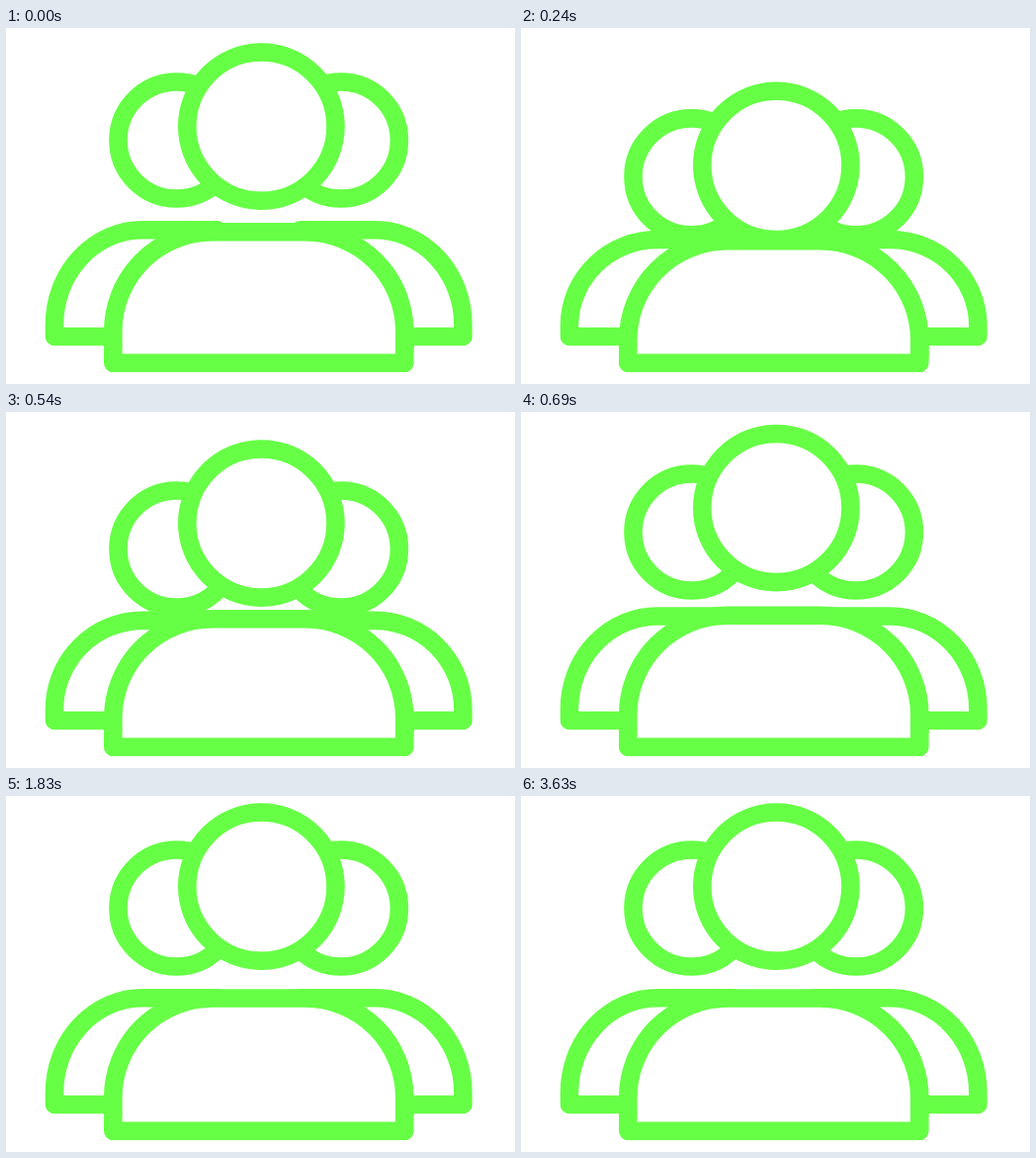
An HTML page without scripts that plays this animation: 515x360 px, repeating every 3810 ms.

```html
<!DOCTYPE html>
<html lang="en">
<head>
<meta charset="utf-8">
<title>Group nod</title>
<style>
  /* --k: how far a figure has ducked, 0 = upright, 1 = lowest */
  @property --k { syntax: "<number>"; inherits: true; initial-value: 0; }

  html, body { margin: 0; width: 100%; height: 100%; overflow: hidden; background: #fff; }
  svg { display: block; width: 515px; height: 360px; }

  .front, .back { animation: 3810ms linear infinite; }
  .front { --drop: 50px; animation-name: duck-front; }
  .back { --drop: 46px; animation-name: duck-back; }

  circle, path {
    fill: #fff;
    stroke: #66ff45;
    stroke-width: 18.6px;
    stroke-linecap: round;
    stroke-linejoin: round;
  }
  .head { transform: translateY(calc(var(--k) * var(--drop))); }
  .arch { transform: translateY(calc(var(--k) * 11.3px)); }
  .shoulder {
    vector-effect: non-scaling-stroke;
    transform: scaleY(calc(1 - var(--k) * .113));
    transform-origin: 0 312px;
  }

  @keyframes duck-front {
    0% { --k: .16; animation-timing-function: step-end; }
    1.575% { --k: .264; animation-timing-function: cubic-bezier(.33, .4, .67, 1); }
    7.612% { --k: 1; animation-timing-function: cubic-bezier(.3, 0, .38, 1); }
    23.097%, 100% { --k: 0; }
  }
  @keyframes duck-back {
    0%, .787% { --k: 0; animation-timing-function: cubic-bezier(.33, 0, .67, 1); }
    8.53% { --k: 1; animation-timing-function: cubic-bezier(.3, 0, .38, 1); }
    24.41%, 100% { --k: 0; }
  }
</style>
</head>
<body>
<svg viewBox="0 0 515 360">
  <g class="back">
    <path class="shoulder" d="M112 312H49V300A89 95.7 0 0 1 138 204.3H214"/>
    <circle class="head" cx="172.5" cy="113.5" r="59"/>
  </g>
  <g class="back" transform="matrix(-1 0 0 1 511.4 0)">
    <path class="shoulder" d="M112 312H49V300A89 95.7 0 0 1 138 204.3H214"/>
    <circle class="head" cx="172.5" cy="113.5" r="59"/>
  </g>
  <g class="front">
    <circle class="head" cx="258.4" cy="91.6" r="75.1"/>
    <path class="arch" d="M108.3 322V305A100.5 100.5 0 0 1 208.8 204.5H302.8A100.5 100.5 0 0 1 403.3 305V322"/>
    <path d="M108.3 322V338.8H403.3V322"/>
  </g>
</svg>
</body>
</html>
```
